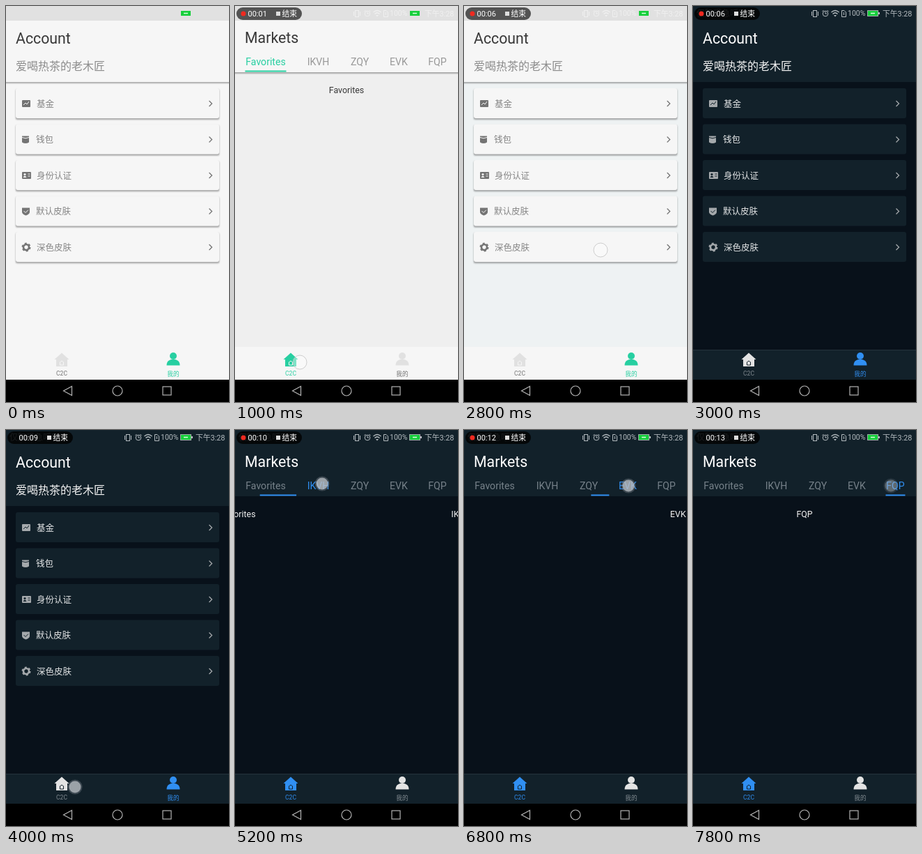
These frames come from a looping animation (320 by 568 pixels, 8 s). An HTML page:

```html
<!DOCTYPE html>
<html lang="zh-CN">
<head>
<meta charset="utf-8">
<style>
  html, body { margin: 0; width: 100%; height: 100%; overflow: hidden; background: #000; }
  svg { display: block; width: 320px; height: 568px; }
  text { font-family: Roboto, 'Noto Sans CJK SC', 'Noto Sans CJK', sans-serif; white-space: pre; }
</style>
</head>
<body>
<svg id="stage" viewBox="0 0 320 568"></svg>
<script>
const LOOP = 8000, STEP = 200, SLIDE = 300;

const LIGHT = {
  status: '#e1e1e1', statusText: '#f0f0f0', panel: '#f6f6f6', body: '#efefef', accountBody: '#eef2f3',
  title: '#383838', sub: '#8c8c8c', label: '#858585', icon: '#747474', tab: '#989898', page: '#383838',
  active: '#27cfa1', idle: '#e1e1e1', idleText: '#727272', pill: '#535353', pillOpacity: 1, shadow: 0.3
};
const DARK = {
  status: '#12212a', statusText: '#b4bbbf', panel: '#12212a', body: '#08111a', accountBody: '#08111a',
  title: '#fff', sub: '#f4f4f4', label: '#e4e6e7', icon: '#a5a9ac', tab: '#77828a', page: '#f2f2f2',
  active: '#308ff2', idle: '#e3e3e3', idleText: '#838c92', pill: '#000', pillOpacity: 0.8, shadow: 0
};

// name, left and right edge of the underline
const TABS = [['Favorites', 14.5, 73.5], ['IKVH', 104, 135], ['ZQY', 166, 192], ['EVK', 222, 248], ['FQP', 276.5, 304.5]];
const MENU = ['基金', '钱包', '身份认证', '默认皮肤', '深色皮肤'];
const LIGHT_SLIDES = [1150, 1450, 1750, 2050];
const DARK_SLIDES = [5054, 5846, 6638, 7430];
const CLOCK = [0, 1000, 1400, 1800, 2200, 2600, 2800, 3200, 3600, 4000, 5000, 6000, 6800, 7600];

// from, until, x, y
const TOUCHES = [
  [800, 1200, 93, 511], [1200, 1400, 122, 79], [1400, 1800, 180, 80], [1800, 2000, 236, 80],
  [2000, 2200, 286, 80], [2400, 2600, 246, 510], [2800, 3000, 196, 350], [4000, 4200, 99, 512],
  [5000, 5400, 125, 77], [5800, 6200, 183, 81], [6600, 7000, 236, 80], [7400, 8000, 284, 80]
];

const rect = (x, y, w, h, fill, extra = '') => `<rect x="${x}" y="${y}" width="${w}" height="${h}" fill="${fill}" ${extra}/>`;
const circle = (x, y, r, fill, extra = '') => `<circle cx="${x}" cy="${y}" r="${r}" fill="${fill}" ${extra}/>`;
const path = (d, fill, extra = '') => `<path d="${d}" fill="${fill}" ${extra}/>`;
const line = (d, color, width = 1) => path(d, 'none', `stroke="${color}" stroke-width="${width}"`);
const text = (s, x, y, size, fill, anchor = 'start') =>
  `<text x="${x}" y="${y}" font-size="${size}" fill="${fill}" text-anchor="${anchor}">${s}</text>`;
const at = (x, y, content) => `<g transform="translate(${x} ${y})">${content}</g>`;
const clamp = v => Math.min(1, Math.max(0, v));

function shadow(x, y, w, strength) {
  return [0, 1, 2].map(i => rect(x, y + i, w, 1, '#000', `opacity="${strength * (1 - i / 3)}"`)).join('');
}

function statusBar(theme, t) {
  const c = theme.statusText;
  let out = rect(0, 0, 320, 21, theme.status);
  if (theme === DARK) out += text('仅限紧急呼叫', 5, 15, 12, '#7d868b');
  if (t > 0) {
    out += rect(172.5, 6.5, 5, 9, 'none', `stroke="${c}"`) + line('M170.5 8v6M179.5 8v6', c)
      + circle(190, 11, 3.8, 'none', `stroke="${c}"`) + line('M190 8.5V11h2M185.5 8l2-2M194.5 8l-2-2', c)
      + line('M198.500 9q5.500-5 11 0M200.500 11.500q3.500-3.500 7 0', c, 1.3) + path('M202 13l2 2.500 2-2.500z', c)
      + line('M213.500 6.500h3.500l2.500 2.500v6.500h-6zM216.500 9v4', c)
      + text('100%', 222, 14.3, 10.5, c) + text('下午3:28', 272, 15, 10.8, c);
  }
  out += theme === DARK
    ? rect(250.5, 6.5, 15, 8, '#17cf3c', 'stroke="#9faaa8"') + rect(266, 9, 2, 3, c)
    : rect(251, 7, 14, 7, '#17cf3c');
  out += line('M255 10.500h6', '#d8ffdf', 1.5);
  if (t > 0) {
    const seconds = CLOCK.filter(s => s <= t).length - 1;
    const recording = theme === LIGHT || seconds % 2 === 0;
    out += rect(2, 2, 94, 18, theme.pill, `rx="9" opacity="${theme.pillOpacity}"`)
      + (recording ? circle(12, 11, 3.5, '#f02a20') : '')
      + text('00:' + String(seconds).padStart(2, '0'), 18.5, 15, 11, '#fff')
      + rect(59, 8, 6, 6, '#ddd') + text('结束', 67.5, 15, 10.8, '#fff');
  }
  return out;
}

function menuIcon(i, color, hole) {
  return [
    rect(0, -5, 12, 10, color, 'rx="1"') + line('M2 2l3-3 2 2 3-4', hole),
    path('M0-5h10v9q-5 3-10 0z', color) + line('M0-3q5 2.500 10 0', hole),
    rect(0, -5, 13, 10, color, 'rx="1"') + circle(4, -1.5, 1.6, hole) + path('M1.500 3q2.500-5 5 0z', hole)
      + line('M8.500-2h3M8.500 1h3', hole),
    path('M0-5h11v6q0 3-5.500 5Q0 4 0 1z', color) + line('M2.500-0.500l2.500 2.500 4-4', hole),
    circle(6, 0, 4, 'none', `stroke="${color}" stroke-width="2.6"`)
      + circle(6, 0, 5.7, 'none', `stroke="${color}" stroke-width="1.6" stroke-dasharray="3 2.970"`)
  ][i];
}

function account(theme, t) {
  const body = t < 1000 ? '#f6f6f6' : theme.accountBody;
  let out = rect(0, 21, 320, 472, body) + rect(0, 20, 320, 89, theme.panel) + shadow(0, 109, 320, theme.shadow)
    + text('Account', 14, 54, 21.3, theme.title) + text('爱喝热茶的老木匠', 14, 91.5, 16, theme.sub);
  MENU.forEach((label, i) => {
    const y = 118 + i * 51.5, mid = y + 22;
    if (theme.shadow) {
      out += rect(12.5, y, 295, 46.5, '#000', 'rx="4" opacity="0.06"')
        + rect(13.5, y + 1, 293, 44.5, '#000', 'rx="3.5" opacity="0.12"')
        + rect(14, y + 1, 292, 43.5, '#000', 'rx="3" opacity="0.15"');
    }
    out += rect(14, y, 292, 43, theme.panel, 'rx="3"')
      + at(23, mid, menuIcon(i, theme.icon, theme.panel))
      + text(label, 44 - i % 2, mid + 4.8, 12.5, theme.label)
      + line(`M291.500 ${mid - 4}l4 4-4 4`, theme.icon, 1.3);
  });
  return out;
}

function markets(theme, slides, t) {
  const position = slides.reduce((sum, s) => sum + clamp((t - s) / SLIDE), 0);
  const from = Math.floor(position), selected = Math.ceil(position);
  const ease = (position - from) ** 2;
  const [left, right] = [1, 2].map(k => TABS[from][k] + (TABS[selected][k] - TABS[from][k]) * ease);

  let out = rect(0, 21, 320, 472, theme.body) + rect(0, 20, 320, 75, theme.panel) + shadow(0, 95, 320, theme.shadow)
    + text('Markets', 14, 53, 21.3, theme.title);
  TABS.forEach(([name, a, b], i) => {
    out += text(name, (a + b) / 2, 85, 14.1, i === selected ? theme.active : theme.tab, 'middle')
      + text(name, 160 + (i - position) * 320, 125, 12.4, theme.page, 'middle');
  });
  return out + rect(left, 92.5, right - left, 2, theme.active);
}

function bottomBar(theme, onMarkets) {
  const top = theme === DARK ? 493 : 489;
  const icon = on => on ? theme.active : theme.idle;
  const label = on => on ? theme.active : theme.idleText;
  return rect(0, top, 320, 536 - top, theme.panel)
    + (theme === DARK ? rect(0, top, 320, 1, '#26343c') : '')
    + path('M80 497.500L90.500 507h-2.500v10H72v-10h-2.500z', icon(onMarkets))
    + line('M77.500 515v-4q2.500-3.500 5 0v4z', theme.panel)
    + text('C2C', 80, 530, 8.6, label(onMarkets), 'middle')
    + circle(240, 502, 5, icon(!onMarkets)) + path('M230.500 515.500q0-7 6.500-8.500h6q6.500 1.500 6.500 8.500z', icon(!onMarkets))
    + text('我的', 240, 530.5, 8.7, label(!onMarkets), 'middle')
    + rect(0, 536, 320, 32, '#000')
    + line('M94.500 545.500v13L82.500 552z', '#b4b4b4', 1.2)
    + circle(160, 552, 7, 'none', 'stroke="#b4b4b4" stroke-width="1.2"')
    + rect(225, 546, 12, 12, 'none', 'stroke="#b4b4b4" stroke-width="1.2"');
}

function touch(theme, t) {
  const hit = TOUCHES.find(([from, until]) => t >= from && t < until);
  if (!hit) return '';
  const [from, , x, y] = hit;
  const fade = clamp(1 - (t - from - 200) / 450);
  const dot = theme === DARK
    ? circle(x, y, 10.5, '#8b929a', 'opacity="0.35"') + circle(x, y, 8.5, '#c0c5ca', 'opacity="0.72"')
    : circle(x, y, 10, '#fff', 'fill-opacity="0.4" stroke="#c4c4c4" stroke-opacity="0.8"');
  return `<g opacity="${fade}">${dot}</g>`;
}

function scene(t) {
  const theme = t < 3000 ? LIGHT : DARK;
  const onMarkets = (t >= 1000 && t < 2400) || t >= 4200;
  const slides = theme === LIGHT ? LIGHT_SLIDES : DARK_SLIDES;
  return (onMarkets ? markets(theme, slides, t) : account(theme, t))
    + statusBar(theme, t) + bottomBar(theme, onMarkets) + touch(theme, t);
}

const stage = document.getElementById('stage');
const start = performance.now();
let shown = -1;

function tick() {
  const elapsed = Math.max(0, performance.now() - start) % LOOP;
  const t = Math.floor(elapsed / STEP) * STEP;
  if (t !== shown) stage.innerHTML = scene(shown = t);
  requestAnimationFrame(tick);
}
tick();
</script>
</body>
</html>
```
